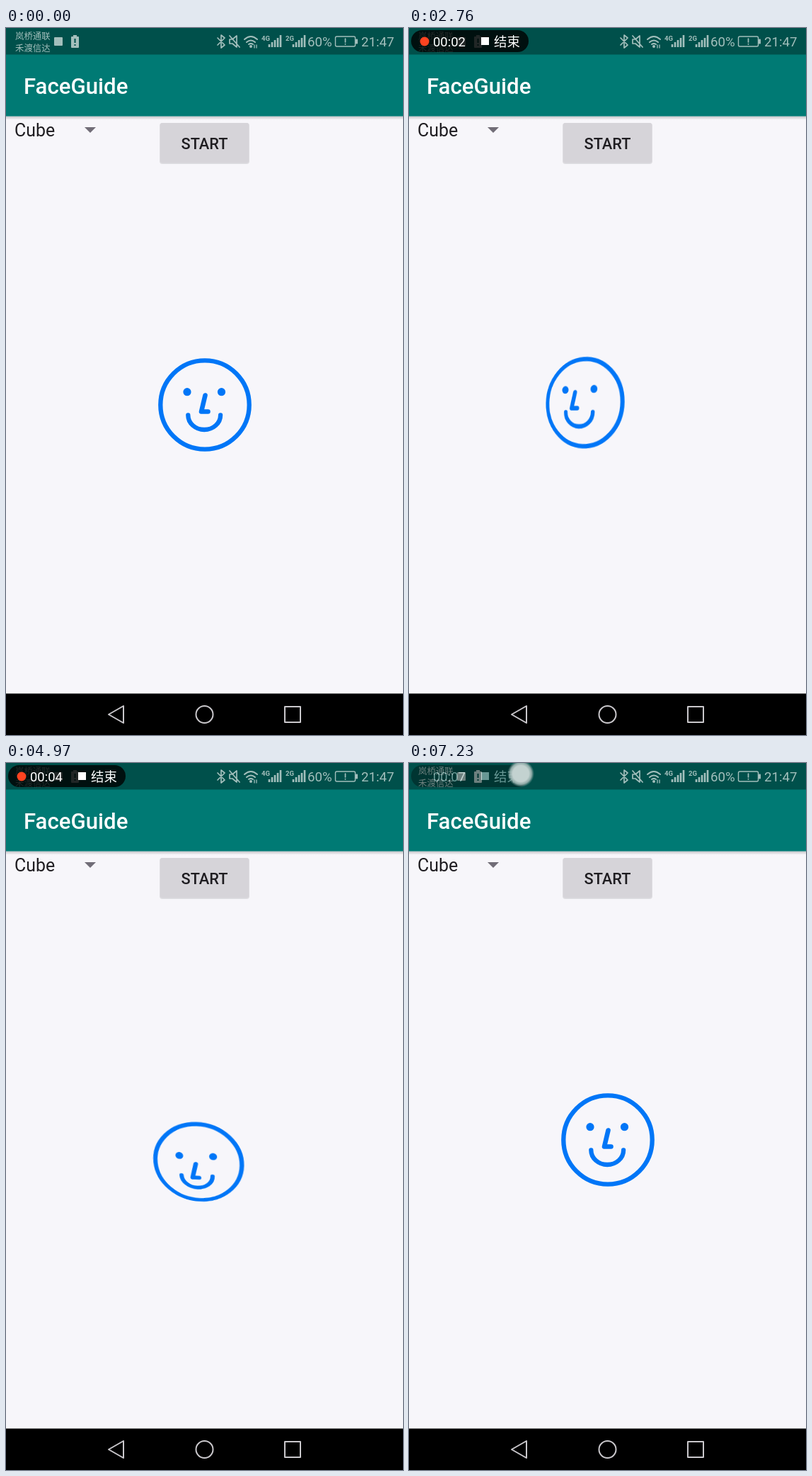
Recreate the animation shown at these times as an HTML page. Size 561 by 998 pixels, loop 7280 ms.

```html
<!DOCTYPE html>
<html lang="en">
<head>
<meta charset="utf-8">
<title>FaceGuide</title>
<style>
  html, body { margin: 0; width: 100%; height: 100%; overflow: hidden; background: #f7f6fa; }
  svg { display: block; }
  text { font-family: Roboto, "Noto Sans CJK SC", "Noto Sans CJK", sans-serif; }
  .medium { font-weight: 500; }
  .line { fill: none; stroke-linecap: round; stroke-linejoin: round; }
  .layer {
    position: absolute; left: 211.2px; top: 462.2px; width: 140px; height: 140px;
    overflow: visible; stroke: #0076f7; stroke-width: 6.3;
  }
  .eyes { fill: #0076f7; stroke: none; }
  #pill, #touch, #button { animation: 7280ms linear infinite; }
  #pill { animation-name: pill; }
  #touch { animation-name: touch; }
  #button { fill: #d6d4d9; animation-name: press; }
  @keyframes pill {
    0%, 0.6% { opacity: 0; }
    2.4%, 97.4% { opacity: 1; }
    99.3% { opacity: .42; }
    100% { opacity: .2; }
  }
  @keyframes touch {
    0%, 95.5% { opacity: 0; }
    96.4%, 100% { opacity: 1; }
  }
  @keyframes press {
    0%, 17.6% { fill: #d6d4d9; }
    18.6%, 19.6% { fill: #c4c2c7; }
    20.8%, 100% { fill: #d6d4d9; }
  }
</style>
</head>
<body>
<svg width="561" height="998" viewBox="0 0 561 998">
  <defs>
    <linearGradient id="shade" x2="0" y2="1">
      <stop stop-color="#000" stop-opacity=".2"/>
      <stop offset="1" stop-color="#000" stop-opacity="0"/>
    </linearGradient>
    <radialGradient id="glow">
      <stop offset=".6" stop-color="#c3d2d0"/>
      <stop offset=".8" stop-color="#9db5b2" stop-opacity=".9"/>
      <stop offset="1" stop-color="#7b9c98" stop-opacity="0"/>
    </radialGradient>
    <path id="bars" d="M1 27v-4M5 27v-7M9 27v-10M13 27v-13M17 27v-17" stroke-width="2.6"/>
  </defs>

  <rect width="561" height="998" fill="#f7f6fa"/>
  <rect y="124.6" width="561" height="5" fill="url(#shade)"/>
  <rect y="37" width="561" height="87.6" fill="#007a74"/>
  <rect width="561" height="37.5" fill="#00504b"/>
  <text class="medium" x="24.9" y="93" font-size="31.2" fill="#fff">FaceGuide</text>

  <!-- status bar -->
  <g fill="#a3bfbc">
    <text x="13" y="16" font-size="12.4">岚桥通联</text>
    <text x="13" y="33" font-size="12.4">禾渡信达</text>
    <rect x="68" y="13" width="12" height="12" rx="1"/>
    <path d="M95 10h5v2h2a1 1 0 0 1 1 1v14a1 1 0 0 1-1 1h-9a1 1 0 0 1-1-1V13a1 1 0 0 1 1-1h2z"/>
    <path d="M97.5 15v6M97.5 23v2" stroke="#00504b" stroke-width="2"/>
    <text x="361" y="18" font-size="9.5" font-weight="700">4G</text>
    <text x="395" y="18" font-size="9.5" font-weight="700">2G</text>
    <text x="426" y="26" font-size="18.7">60%</text>
    <text x="502" y="26" font-size="18.7">21:47</text>
    <circle cx="346" cy="26" r="2"/>
    <rect x="494" y="15.5" width="3" height="7" rx="1"/>
  </g>
  <g class="line" stroke="#a3bfbc" stroke-width="1.7">
    <path d="M299 14l10 10-5 4V10l5 4-10 10"/>
    <path d="M316 16h4l6-5v16l-6-5h-4zM316 11l14 16"/>
    <path d="M337 16q9-8 18 0M340 20q6-5 12 0M343 23q3-2 6 0" stroke-width="2"/>
    <path d="M351 24v4M354 24v4" stroke-width="1.3"/>
    <rect x="465.5" y="12" width="28" height="14" rx="2" stroke-width="1.4"/>
    <path d="M479.5 15v5M479.5 22.5v.5"/>
  </g>
  <g stroke="#a3bfbc">
    <use href="#bars" x="371"/>
    <use href="#bars" x="405"/>
  </g>

  <!-- recorder pill -->
  <g id="pill">
    <rect x="3" y="3" width="166" height="31" rx="15.5" fill="#000" fill-opacity=".8"/>
    <circle id="rec" cx="22" cy="19" r="6.5" fill="#ff4320"/>
    <g fill="#fff" font-size="18.4">
      <text id="clock" x="34" y="26">00:00</text>
      <rect x="102" y="13" width="11" height="11"/>
      <text x="120" y="26">结束</text>
    </g>
  </g>
  <circle id="touch" cx="158" cy="15" r="19" fill="url(#glow)"/>

  <!-- controls -->
  <text x="12" y="153" font-size="24.9" fill="#1f1d21">Cube</text>
  <path d="M111 140h16l-8 8z" fill="#716d77"/>
  <rect x="217" y="134" width="127" height="58" rx="4" fill="#000" fill-opacity=".1"/>
  <rect id="button" x="218" y="134" width="125" height="56.5" rx="3"/>
  <text class="medium" x="280.5" y="171" font-size="21.8" fill="#1f1d21" text-anchor="middle">START</text>

  <!-- navigation bar -->
  <rect y="939.5" width="561" height="59" fill="#000"/>
  <g class="line" stroke="#c9c7cb" stroke-width="2">
    <path d="M145 969l21-12v24z"/>
    <circle cx="280.5" cy="969" r="12"/>
    <rect x="394" y="958" width="22" height="22"/>
  </g>
</svg>

<!-- face, one layer per height above the cube's front -->
<svg class="layer line" data-lift="0" viewBox="-70 -70 140 140">
  <circle r="62.7"/>
</svg>
<svg class="layer line" data-lift="9" viewBox="-70 -70 140 140">
  <g class="eyes">
    <circle cx="-25" cy="-18.3" r="5.6"/>
    <circle cx="23.5" cy="-18.3" r="5.6"/>
  </g>
  <path d="M-23.7 14.5A22.9 20.5 0 0 0 22.1 14.5"/>
</svg>
<svg class="layer line" data-lift="22" viewBox="-70 -70 140 140">
  <path d="M.5-13.5L-5 9.5H4.5" stroke-width="6.6"/>
</svg>

<script>
  const LOOP = 7280, START = 1370, END = 6370, RAMP = 1000;
  const MAX_TILT = 27.5, DEPTH = 78, VIEW = 500;
  // time in ms, direction of the tilt in degrees
  const TURN = [[START, 290], [2030, 288], [2350, 264], [3430, 58], [4380, -129], [5560, -379], [END, -540]];
  const clamp = (v, lo, hi) => Math.min(hi, Math.max(lo, v));
  const layers = [...document.querySelectorAll('.layer')];
  const clock = document.getElementById('clock');
  const rec = document.getElementById('rec');

  function direction(t) {
    t = clamp(t, START, END);
    const i = TURN.findIndex((key, n) => n > 0 && t <= key[0]);
    const [t0, a0] = TURN[i - 1], [t1, a1] = TURN[i];
    return a0 + (a1 - a0) * (t - t0) / (t1 - t0);
  }

  function drawFace(t) {
    const tilt = MAX_TILT * clamp(Math.min(t - START, END - t) / RAMP, 0, 1);
    const angle = direction(t) * Math.PI / 180;
    const axis = `${(-Math.sin(angle)).toFixed(5)}, ${Math.cos(angle).toFixed(5)}, 0`;
    for (const layer of layers) {
      const lift = Number(layer.dataset.lift);
      // the scale keeps lifted layers at their drawn size when the cube is at rest
      layer.style.transform = `perspective(${VIEW}px) translateZ(${-DEPTH}px) ` +
        `rotate3d(${axis}, ${tilt.toFixed(3)}deg) ` +
        `translateZ(${DEPTH + lift}px) scale(${1 - lift / VIEW})`;
    }
  }

  function render() {
    const t = performance.now() % LOOP;
    const recorded = Math.max(0, t - 90);
    drawFace(t);
    clock.textContent = '00:0' + Math.floor(recorded / 1000);
    rec.setAttribute('visibility', recorded % 1000 >= 500 ? 'visible' : 'hidden');
    requestAnimationFrame(render);
  }
  render();
</script>
</body>
</html>
```
